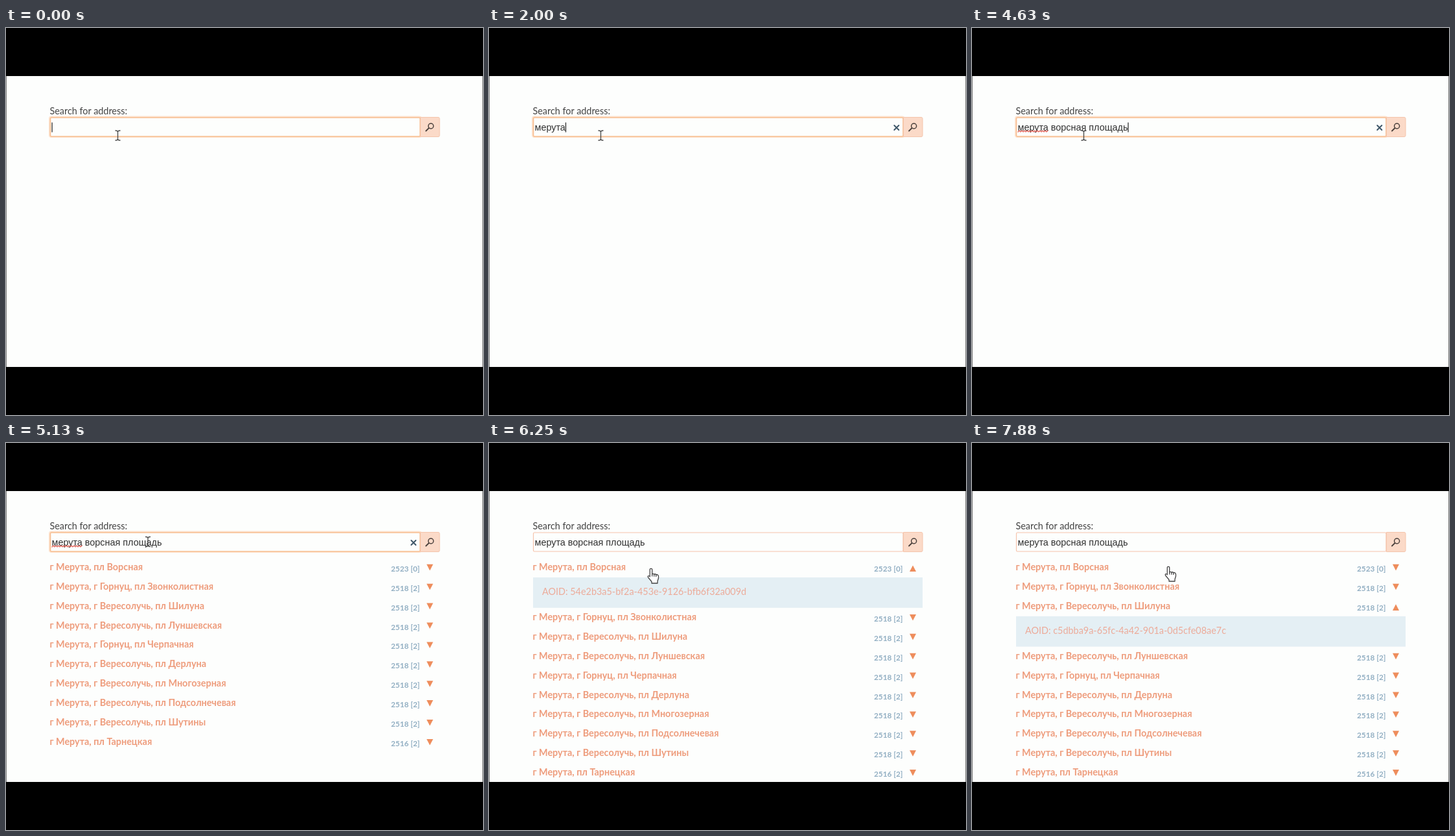
These frames come from a looping animation (736x596 px, 8 s). An HTML page:

```html
<!DOCTYPE html>
<html lang="en">
<head>
<meta charset="utf-8">
<title>Address search</title>
<style>
  html, body { margin: 0; width: 100%; height: 100%; overflow: hidden; background: #000; }
  svg { display: block; width: 736px; height: 596px; }
  text { font: 14.4px Lato, sans-serif; white-space: pre; }
  .label { fill: #444; }
  .typed { font: 14.4px "Liberation Sans", Arial, sans-serif; fill: #303030; }
  .name { font-weight: 700; fill: #ee9c7c; }
  .count { font-size: 11.8px; font-weight: 700; fill: #92afc3; text-anchor: end; }
  .mark { fill: #ee8d5c; }
  .detail rect { fill: #e4eff4; }
  .detail text { fill: #ecab9a; }
  .line { fill: none; stroke-linecap: round; }
  .cursor { fill: #fff; stroke: #444; stroke-width: 1.3; stroke-linejoin: round; }
</style>
</head>
<body>
<svg viewBox="0 0 736 596">
  <defs>
    <clipPath id="panel"><rect x="1" y="74" width="734" height="448"/></clipPath>
  </defs>
  <rect width="736" height="596"/>
  <rect x="0.5" y="74" width="735" height="448" fill="#fdfefd"/>
  <text class="label" x="67.5" y="132.5">Search for address:</text>

  <rect id="glow" x="68" y="137.5" width="571.5" height="29.5" rx="2" fill="none" stroke="#fde3cf" stroke-width="4"/>
  <rect id="field" x="68.5" y="138" width="570.5" height="29" rx="1.5" fill="#fdfefd"/>
  <path d="M639.5 137.5h27.5q2 0 2 2v26q0 2-2 2h-27.5z" fill="#fbdac8" stroke="#f4c5ac"/>
  <g class="line" stroke="#4a403c" stroke-width="1.5">
    <circle cx="655.6" cy="151" r="4"/>
    <path d="M652.6 154L648 158.5" stroke-width="1.8"/>
  </g>
  <path id="clear" class="line" d="M625.3 150l7 7m0-7l-7 7" stroke="#41586a" stroke-width="2"/>
  <text id="typed" class="typed" x="70.5" y="157.5"></text>
  <path id="squiggle" class="line" stroke="#e0564c" stroke-width="1.2"/>
  <rect id="caret" y="145.5" width="1.2" height="15" fill="#222"/>

  <g id="list" clip-path="url(#panel)"></g>

  <path id="beam" class="line" stroke="#444" stroke-width="1.3"
        d="M-3.5-7.5Q0-7.5 0-5.5Q0-7.5 3.5-7.5M0-6V6M-3.5 7.5Q0 7.5 0 5.5Q0 7.5 3.5 7.5"/>
  <path id="hand" class="cursor"
        d="M-1.7 1Q-1.7-.6 0-.6T1.7 1V8Q3.2 6.6 4.8 8.2Q6.4 7 7.8 8.8Q9.6 7.8 11 9.8Q11.8 11 11.5 14L10 19V22H1V19.5Q-1 17-4.3 13.2Q-5.3 11.6-4.4 10.8Q-3.2 10-1.7 11.8zM1.7 8V11.5M4.8 8.4V11.8M7.8 9V12"/>
</svg>
<script>
  const TICK = 125, LOOP = 8000, BLINK = 4.25;
  const ROW_TOP = 195.8, PITCH = 29.9, DETAIL = 47.2;
  const QUERY = "мерута ворсная площадь";
  const KEYS = [5, 8, 10, 11, 13, 16, 17, 18, 19, 20, 21, 22, 24, 25, 26, 27, 27, 28, 30, 32, 34, 37];
  const SPELL = 18, RESULTS = 39, OPEN_FIRST = 49, OPEN_THIRD = 60;
  const TOWN = "г Мерута, ", SUB_A = TOWN + "г Горнуц, ", SUB_B = TOWN + "г Вересолучь, ";
  const ROWS = [
    [TOWN + "пл Ворсная", "2523 [0]", "54e2b3a5-bf2a-453e-9126-bfb6f32a009d"],
    [SUB_A + "пл Звонколистная"],
    [SUB_B + "пл Шилуна", "2518 [2]", "c5dbba9a-65fc-4a42-901a-0d5cfe08ae7c"],
    [SUB_B + "пл Луншевская"],
    [SUB_A + "пл Черпачная"],
    [SUB_B + "пл Дерлуна"],
    [SUB_B + "пл Многозерная"],
    [SUB_B + "пл Подсолнечевая"],
    [SUB_B + "пл Шутины"],
    [TOWN + "пл Тарнецкая", "2516 [2]"]
  ];
  // pointer hotspot: tick, x, y
  const PATH = [
    [0, 172.5, 165.5], [38, 172.5, 165.5], [41, 219, 152], [42, 226, 160], [45, 238, 188],
    [47, 238, 188], [49, 250, 194], [50, 250, 194], [54, 234, 258], [55, 232, 264],
    [59, 221, 292.5], [60, 222, 292], [61, 256, 256], [62, 282, 220], [63, 303, 191]
  ];

  const $ = id => document.getElementById(id);
  const show = (el, on) => { el.style.display = on ? "" : "none"; };
  const place = (el, x, y) => el.setAttribute("transform", `translate(${x} ${y})`);

  function add(parent, tag, attrs, text) {
    const el = document.createElementNS("http://www.w3.org/2000/svg", tag);
    for (const key in attrs) el.setAttribute(key, attrs[key]);
    if (text) el.textContent = text;
    parent.append(el);
    return el;
  }

  const rows = ROWS.map(([name, count = "2518 [2]", id]) => {
    const row = add($("list"), "g", {});
    add(row, "text", { class: "name", x: 67.5 }, name);
    add(row, "text", { class: "count", x: 638.5, y: 2 }, count);
    const mark = add(row, "path", { class: "mark" });
    const detail = add(row, "g", { class: "detail" });
    if (id) {
      add(detail, "rect", { x: 68, y: 11.2, width: 601, height: 46.8 });
      add(detail, "text", { x: 82, y: 38.3 }, "AOID: " + id);
    }
    return { row, mark, detail };
  });

  function drawList(open) {
    rows.forEach(({ row, mark, detail }, i) => {
      const shift = open >= 0 && i > open ? DETAIL : 0;
      place(row, 0, ROW_TOP + i * PITCH + shift);
      show(detail, i === open);
      mark.setAttribute("d", i === open ? "M649 2.3h10l-5-9.6z" : "M649-9h10l-5 9.6z");
    });
  }

  function pointerAt(tick) {
    const i = Math.max(1, PATH.findIndex(p => p[0] >= tick));
    const [t0, x0, y0] = PATH[i - 1], [t1, x1, y1] = PATH[i];
    const k = (tick - t0) / (t1 - t0);
    return [x0 + (x1 - x0) * k, y0 + (y1 - y0) * k];
  }

  function caretOn(tick) {
    if (tick < KEYS[0]) return tick < 3;
    const last = KEYS.filter(k => k <= tick).pop();
    return Math.floor((tick - last + 0.25) / BLINK) % 2 === 0;
  }

  function drawSquiggle() {
    const end = 70.5 + $("typed").getSubStringLength(0, 6);
    let d = "M71 160";
    for (let x = 73, up = true; x < end; x += 2, up = !up) d += `L${x} ${up ? 158 : 160}`;
    $("squiggle").setAttribute("d", d);
  }

  function draw(tick) {
    const focused = tick < OPEN_FIRST;
    const length = KEYS.filter(k => k <= tick).length;
    const typed = $("typed");
    typed.textContent = QUERY.slice(0, length);

    show($("glow"), focused);
    $("field").setAttribute("stroke", focused ? "#f8bd90" : "#f6c4ac");
    $("field").setAttribute("stroke-width", focused ? 1.6 : 1.2);
    show($("clear"), focused && length);
    show($("caret"), focused && caretOn(tick));
    $("caret").setAttribute("x", 70.5 + (length ? typed.getComputedTextLength() : 0));

    const misspelt = focused && tick >= SPELL;
    show($("squiggle"), misspelt);
    if (misspelt) drawSquiggle();

    show($("list"), tick >= RESULTS);
    drawList(tick >= OPEN_THIRD ? 2 : tick >= OPEN_FIRST ? 0 : -1);

    const [x, y] = pointerAt(tick), inField = y < 168;
    show($("beam"), inField);
    show($("hand"), !inField);
    place(inField ? $("beam") : $("hand"), x, y);
  }

  const start = performance.now();
  let shown = -1;
  function frame() {
    const tick = Math.floor((performance.now() - start) % LOOP / TICK);
    if (tick !== shown) draw(shown = tick);
    requestAnimationFrame(frame);
  }
  frame();
</script>
</body>
</html>
```
